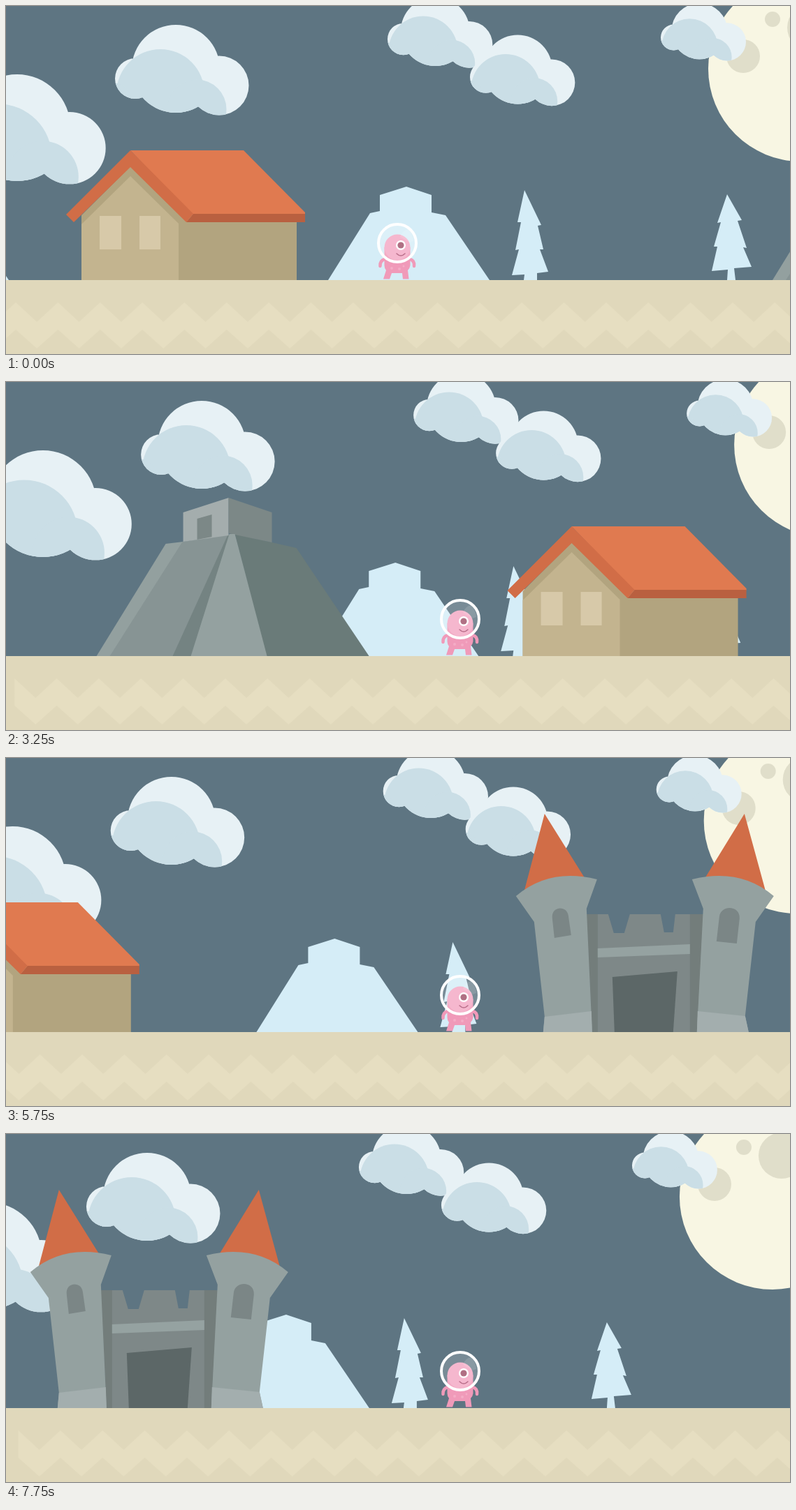
An HTML page with a canvas for the animation above (8 s loop, 1122 px wide and 499 px high).

```html
<!DOCTYPE html>
<html lang="en">
<head>
<meta charset="utf-8">
<title>Moonlit walk</title>
<style>
  html, body { margin: 0; width: 100%; height: 100%; overflow: hidden; background: #5e7582; }
  canvas { display: block; }
</style>
</head>
<body>
<canvas id="stage" width="1122" height="499"></canvas>
<script>
const ctx = document.getElementById('stage').getContext('2d');
const LOOP = 8000, STEP = 250;
const SPEED = 347.5, RAMP = 0.207, SHIFT = 90;
const GROUND = 393, TAU = Math.PI * 2;

// Shapes are SVG path strings, parsed once.
const paths = new Map();
function shape(color, d) {
  if (!paths.has(d)) paths.set(d, new Path2D(d));
  ctx.fillStyle = color;
  ctx.fill(paths.get(d));
}

function disc(color, x, y, r) {
  ctx.fillStyle = color;
  ctx.beginPath();
  ctx.arc(x, y, r, 0, TAU);
  ctx.fill();
}

function at(x, y, draw, scale = 1) {
  ctx.save();
  ctx.translate(x, y);
  ctx.scale(scale, scale);
  draw();
  ctx.restore();
}

const puffs = new Path2D();
for (const [x, y, r] of [[87, 63, 63], [149, 87, 42.5], [29, 77, 29]]) {
  puffs.moveTo(x + r, y);
  puffs.arc(x, y, r, 0, TAU);
}

function cloud() {
  ctx.fillStyle = '#e7f1f5';
  ctx.fill(puffs);
  ctx.clip(puffs);
  disc('#cadee6', 65, 98, 63);
  disc('#cadee6', 117, 121, 42.5);
  disc('#cadee6', -4, 112, 29);
}

function moon() {
  disc('#f8f6e3', 1138, 90, 133);
  disc('#e0deca', 1055, 72, 24);
  disc('#e0deca', 1097, 19, 11);
  disc('#e0deca', 1151, 31, 33);
}

function sky() {
  moon();
  at(-283, -54, cloud, 1.25);
  at(-90, 98, cloud, 1.215);
  at(156, 27, cloud);
  at(546, -13, cloud, 0.785);
  at(664, 41.5, cloud, 0.785);
  at(937, -4, cloud, 0.637);
}

const SNOW = '#d5edf7';
function mountain() {
  shape(SNOW, 'M461 393L521 297 535 294V271L573 259 609 271V296L629 300 692 393Z');
}

function hills() {
  at(-688, 0, mountain);
  mountain();
  shape(SNOW, 'M742 264L766 314 761 315 769 349 764 349 776 381 760 383V393H741L742 385 724 386 734 349 729 350 737 310 732 310Z');
  shape(SNOW, 'M1032 270L1053 307 1047 308 1060 347 1055 346 1067 374 1042 376 1044 393H1032L1033 378 1010 380 1018 345 1013 345 1023 310 1018 311Z');
}

function house() {
  shape('#b2a47f', 'M108 393V300L178 230 247 298H416V393Z');
  shape('#c3b48f', 'M108 393V313L178 244 247 312V393Z');
  shape('#d7c9a9', 'M134 301H165V349H134ZM191 301H221V349H191Z');
  shape('#e07a50', 'M178 207H340L428 296V299H266Z');
  shape('#b96040', 'M268 298H428V310H258Z');
  shape('#d16d47', 'M178 207L86 299 97 310 178 231 258 310 268 298Z');
}

function pyramid() {
  shape('#93a09f', 'M0 393L99 232 124 229 20 393Z');
  shape('#879494', 'M19 393L123 229 189 219 110 393Z');
  shape('#748382', 'M109 393L188 219 192 219 136 393Z');
  shape('#6a7b79', 'M198 218L286 238 390 393H243Z');
  shape('#a4adad', 'M124 187L189 166V220L124 229Z');
  shape('#7c8887', 'M189 166L251 187V230L189 217ZM144 196L165 190V222L144 226Z');
  shape('#94a1a0', 'M135 393L190 218H198L244 393Z');
}

function castle() {
  shape('#7e8888', 'M570 224H601L609 251H624L632 224H676L681 250H694L697 224H737V393H578Z');
  shape('#737d7b', 'M570 224H586V393H578ZM718 224H737L728 393H718Z');
  shape('#95a2a1', 'M586 273L718 267V281L586 286Z');
  shape('#5c6767', 'M607 314L700 306 694 393H610Z');
  shape('#d16d47', 'M510 80L568 173 481 190ZM796 80L826 190 739 173Z');
  shape('#94a1a0', 'M469 198Q517 157 585 174L570 216 578 393H508L510 371 495 235Z');
  shape('#94a1a0', 'M838 198Q790 157 721 174L737 216 728 393H802L797 370 812 235Z');
  shape('#a3aeae', 'M510 371L577 363 578 393H508ZM797 370L729 363 728 393H802Z');
  shape('#7b8686', 'M524 258L521 230C519 212 542 211 544 226L548 254ZM756 263L760 228C762 210 790 211 789 230L785 266Z');
}

function ground(offset) {
  const period = 60.35, half = period / 2;
  const start = ((offset + 14) % period + period) % period - 2 * period;
  ctx.fillStyle = '#e0d8bb';
  ctx.fillRect(-200, GROUND, 1500, 106);
  ctx.fillStyle = '#e6dec1';
  ctx.beginPath();
  for (let i = 0; i <= 44; i++) ctx.lineTo(start + i * half, i % 2 ? 453 : 425);
  for (let i = 44; i >= 0; i--) ctx.lineTo(start + i * half, i % 2 ? 491 : 464);
  ctx.fill();
}

function stroke(color, width, d) {
  ctx.strokeStyle = color;
  ctx.lineWidth = width;
  ctx.lineCap = 'round';
  ctx.stroke(new Path2D(d));
}

function alien() {
  const pink = '#f09ab9';
  stroke(pink, 4.5, 'M-18 363Q-25 365 -24.5 373M18 363Q25 365 24 373');
  shape(pink, 'M-18.5 346H18.5V372Q18 376 15 379L16.5 391.5H8L7 383H-8L-11 391.5H-20L-16 379Q-18.5 376 -18.5 372Z');
  disc('#f3a9c4', 0, 346, 18.5);
  disc('#f4acc6', -8, 376, 2);
  disc('#f4acc6', 3, 377, 2);
  disc('#f4acc6', 9, 373, 1.5);
  disc('rgba(255,255,255,.16)', 0, 340, 27);
  shape('rgba(255,255,255,.13)', 'M4 331Q7 321 16 320Q23 328 23 337L18 339Z');
  disc('#fff', 5, 343, 7);
  disc('#b07084', 5, 343, 4.6);
  stroke('#b96f8a', 1.5, 'M-1 355Q5 361 11 355');
  ctx.strokeStyle = '#fff';
  ctx.lineWidth = 4;
  ctx.beginPath();
  ctx.arc(0, 340, 27, 0, TAU);
  ctx.stroke();
}

function render(ms) {
  const t = Math.floor(ms % LOOP / STEP) * STEP / 1000;
  // The walk starts from rest; the stage slides right as speed builds up.
  const pace = 1 - Math.exp(-t / RAMP);
  const travel = SPEED * (t - RAMP * pace);

  ctx.fillStyle = '#5e7582';
  ctx.fillRect(0, 0, 1122, 499);
  at(SHIFT * pace, 0, () => {
    at(-travel / 20, 0, sky);
    at(-travel / 10, 0, hills);
    at(-travel, 0, () => {
      house();
      at(1097, 0, pyramid);
      at(1599, 0, house);
      at(2097, 0, castle);
    });
    ground(-travel);
    at(560, 0, alien);
  });
}

const begin = performance.now();
function tick() {
  render(performance.now() - begin);
  requestAnimationFrame(tick);
}
tick();
</script>
</body>
</html>
```
